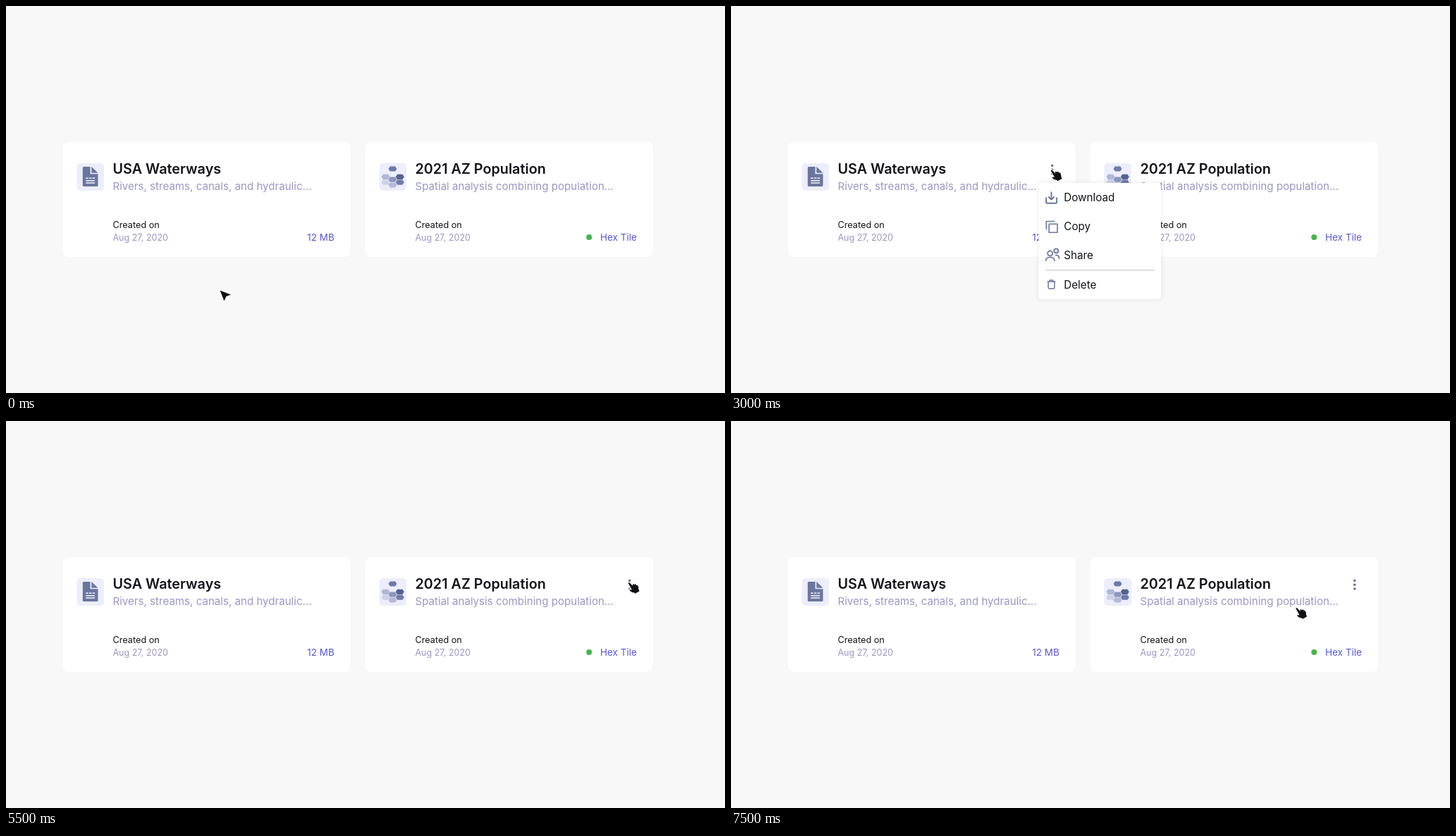
An HTML page with a canvas that plays this animation: 1020 by 549 pixels, repeating every 8000 ms.

```html
<!DOCTYPE html>
<html lang="en">
<head>
<meta charset="utf-8">
<title>Dataset cards</title>
<style>
  html, body { margin: 0; width: 100%; height: 100%; overflow: hidden; background: #f8f8f8; }
  canvas { display: block; width: 1020px; height: 549px; }
</style>
</head>
<body>
<canvas id="stage"></canvas>
<script>
const W = 1020, H = 549, LOOP = 8000;
const INK = '#121318', MUTED = '#9a97c3', LINK = '#5657dc', ICON = '#6b769f', TILE = '#eceefb';

const canvas = document.getElementById('stage');
const ctx = canvas.getContext('2d');
const scale = window.devicePixelRatio || 1;
canvas.width = W * scale;
canvas.height = H * scale;

// Each step holds until the next one begins.
const steps = [
  { at: 0,    cursor: 'arrow', x: 303, y: 403 },
  { at: 2000, cursor: 'hand', x: 317, y: 302, dots: 0 },
  { at: 2500, cursor: 'hand', x: 453.5, y: 232, dots: 0 },
  { at: 3000, cursor: 'hand', x: 453.5, y: 232, dots: 0, menu: 436.5 },
  { at: 4000, cursor: 'hand', x: 509, y: 264, dots: 0, menu: 436.5, hover: true },
  { at: 4500, cursor: 'hand', x: 521, y: 268.5, dots: 1 },
  { at: 5500, cursor: 'hand', x: 882.5, y: 228.5, dots: 1 },
  { at: 6000, cursor: 'hand', x: 882.5, y: 228.5, dots: 1, menu: 729 },
  { at: 7000, cursor: 'hand', x: 801, y: 264.5, dots: 1, menu: 729, hover: true },
  { at: 7500, cursor: 'hand', x: 801, y: 264.5, dots: 1 }
];

const cards = [
  { x: 80.5, title: 'USA Waterways', note: 'Rivers, streams, canals, and hydraulic...', tag: '12 MB', icon: drawDoc },
  { x: 509.5, title: '2021 AZ Population', note: 'Spatial analysis combining population...', tag: 'Hex Tile', icon: drawHexes, live: true }
];

function text(str, x, y, size, color, weight = 400, align = 'left') {
  ctx.font = `${weight} ${size}px Inter, "Open Sans", sans-serif`;
  ctx.textAlign = align;
  ctx.fillStyle = color;
  ctx.fillText(str, x, y);
}

function box(x, y, w, h, r, color) {
  ctx.fillStyle = color;
  ctx.beginPath();
  ctx.roundRect(x, y, w, h, r);
  ctx.fill();
}

function dot(x, y, r, color) {
  ctx.fillStyle = color;
  ctx.beginPath();
  ctx.arc(x, y, r, 0, Math.PI * 2);
  ctx.fill();
}

function ring(x, y, r, width) {
  ctx.strokeStyle = ICON;
  ctx.lineWidth = width;
  ctx.beginPath();
  ctx.arc(x, y, r, 0, Math.PI * 2);
  ctx.stroke();
}

function line(d, color = ICON, width = 1.6) {
  ctx.strokeStyle = color;
  ctx.lineWidth = width;
  ctx.stroke(new Path2D(d));
}

function at(x, y, draw) {
  ctx.save();
  ctx.translate(x, y);
  draw();
  ctx.restore();
}

function drawDoc() {
  ctx.fillStyle = ICON;
  ctx.fill(new Path2D('M9.7 5H19V15.2H30V31.5Q30 33 28.5 33H9.7Q8.3 33 8.3 31.5V6.5Q8.3 5 9.7 5Z'));
  ctx.fill(new Path2D('M20.8 5L30 13.7H20.8Z'));
  line('M12.7 21.3H16.2M17.4 21.3H20.9M22.1 21.3H25.6M12.7 24.7H25.6M12.7 28H25.6', '#f4f5ff', 1.5);
}

function drawHexes() {
  const cells = [
    [19, 8, '#6e79a7'], [9, 19.3, '#b1b6d5'], [29.3, 19.3, '#566190'], [19, 23.2, '#8d96bd'],
    [9, 27.2, '#ced1e7'], [29.3, 27.2, '#707ba9'], [19, 31, '#b4b9d7']
  ];
  for (const [x, y, color] of cells) {
    ctx.fillStyle = color;
    at(x, y, () => ctx.fill(new Path2D('M-6 0L-3.6 -3.6H3.6L6 0L3.6 3.6H-3.6Z')));
  }
}

function drawCard(card, showDots) {
  at(card.x, 193, () => {
    ctx.shadowColor = 'rgba(40, 40, 80, .03)';
    ctx.shadowBlur = 2 * scale;
    box(0, 0, 408.5, 163, 8, '#fff');
    ctx.shadowColor = 'transparent';
    box(20, 30, 38.5, 39, 5, TILE);
    at(20, 30, card.icon);
    text(card.title, 71, 44.5, 19.8, INK, 600);
    text(card.note, 71, 67.5, 15.1, MUTED);
    text('Created on', 71, 122, 12.7, INK);
    text('Aug 27, 2020', 71, 140, 12.5, MUTED);
    text(card.tag, 385.3, 140, 13.5, LINK, 400, 'right');
    if (card.live) dot(317.7, 135, 4, '#45b54c');
    if (showDots) for (const y of [33.4, 39.2, 45]) dot(375.2, y, 1.7, '#5f6a95');
  });
}

function drawMenu(x, hover) {
  at(x, 251, () => {
    ctx.save();
    ctx.shadowColor = 'rgba(30, 30, 70, .1)';
    ctx.shadowBlur = 6 * scale;
    box(0, 0, 173.5, 165, 4, '#fff');
    ctx.restore();
    if (hover) box(0, 0, 173.5, 41, [4, 4, 0, 0], '#eceefc');

    ['Download', 'Copy', 'Share', 'Delete'].forEach((label, i) =>
      text(label, 35.8, [26.2, 67, 107.7, 150][i], 15.2, INK));

    line('M18 12.5V23.5M13.8 19.5L18 23.7L22.2 19.5M10.5 20.5V27.5Q10.5 28.8 11.8 28.8H24.3Q25.6 28.8 25.6 27.5V20.5', ICON, 1.9);
    line('M10.8 66V54.5H23M14.7 58.3H26.5V70.3H14.7Z', ICON, 1.6);
    ring(16.2, 99.8, 3.5, 1.8);
    ring(24.8, 96.3, 3, 1.8);
    line('M10 110.8C10 103.6 22.6 103.6 22.6 110.8M23.5 102.4C27 101.8 29.2 104 29.2 107.8', ICON, 1.8);
    line('M12.2 140H23.8M15.6 139.8V138H20.4V139.8M13.6 140V148.6Q13.6 150 15 150H21Q22.4 150 22.4 148.6V140', ICON, 1.5);
    line('M9.2 123.7H165', '#cbcce2', 1.3);
  });
}

const shapes = {
  arrow: new Path2D('M.6 .6L16 6.5L9.4 9L6.5 15.4Z'),
  hand: new Path2D('M.5 1Q1.2 .1 2.3 1.1L6.7 5.5L6.4 3.6Q7.4 1.9 8.7 3.3L9.2 4.3L9.3 3.4Q10.3 2.1 11.3 3.6L11.7 4.8' +
    'Q12.7 3.4 13.7 5Q15 7 14.8 9.6L16 13L10 16.2L8.6 15Q5.2 15 2.4 12.3Q1.5 10.7 3 10.4L5.4 11.2L4.2 8.5L.6 2.3Q.1 1.5 .5 1Z')
};

function drawCursor({ cursor, x, y }) {
  at(x, y, () => {
    ctx.save();
    ctx.shadowColor = 'rgba(0, 0, 0, .1)';
    ctx.shadowBlur = 2 * scale;
    ctx.strokeStyle = '#fff';
    ctx.lineWidth = 2.2;
    ctx.stroke(shapes[cursor]);
    ctx.restore();
    ctx.fillStyle = '#101014';
    ctx.fill(shapes[cursor]);
  });
}

function render(now) {
  const t = now % LOOP;
  const step = steps.findLast(s => s.at <= t);
  ctx.setTransform(scale, 0, 0, scale, 0, 0);
  ctx.lineJoin = 'round';
  ctx.fillStyle = '#f8f8f8';
  ctx.fillRect(0, 0, W, H);
  cards.forEach((card, i) => drawCard(card, step.dots === i));
  if (step.menu) drawMenu(step.menu, step.hover);
  drawCursor(step);
}

const start = performance.now();
function tick() {
  render(performance.now() - start);
  requestAnimationFrame(tick);
}
tick();
</script>
</body>
</html>
```
